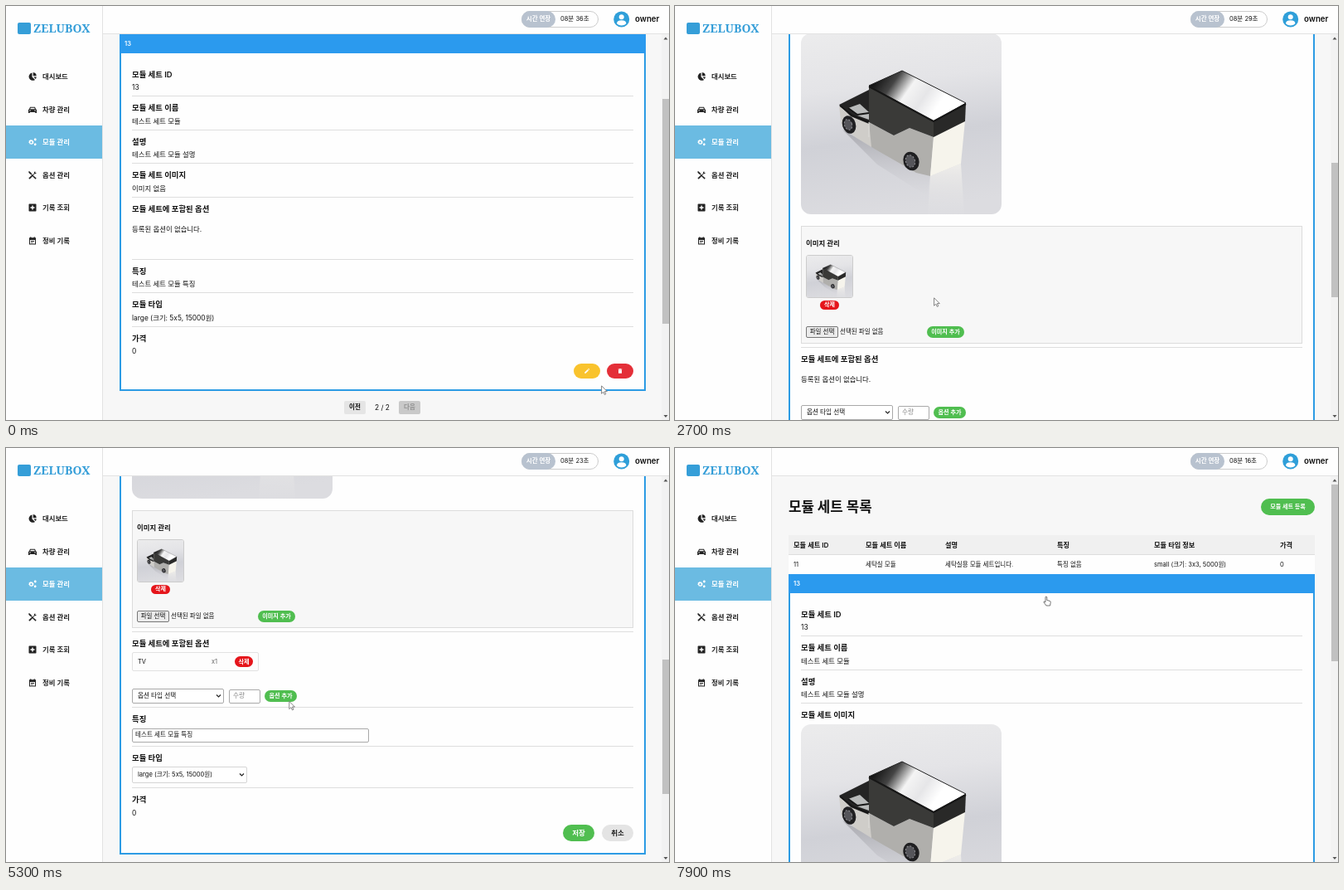
Recreate the animation shown at these times as an HTML page. Size 800x499 px, loop 8000 ms.

```html
<!DOCTYPE html>
<html>
<head>
<meta charset="utf-8">
<title>Module management</title>
<style>
* { box-sizing: border-box; }
html, body { margin: 0; width: 100%; height: 100%; overflow: hidden; }
body { font: 8.4px/20px Inter, "Noto Sans CJK KR", "Noto Sans CJK", sans-serif; color: #111; }
#stage { position: relative; width: 800px; height: 499px; overflow: hidden; background: #f7f7f7; }
#stage div, #stage p, #stage svg { position: absolute; margin: 0; white-space: nowrap; }
#page { left: 0; top: 0; width: 791px; }
.box { display: flex; align-items: center; justify-content: center; line-height: 1; }
.start { justify-content: flex-start; }
.label { font-size: 9.4px; font-weight: 600; }
.title { font-size: 16.8px; font-weight: 700; }
.th { font-size: 8.2px; font-weight: 600; }
.small { font-size: 7.5px; }
.sub { font-size: 8.4px; font-weight: 600; }
.dim { color: #666; }
.white { background: #fefefe; }
.head { background: #f0f0f0; }
.rule { background: #dedede; height: 1px; }
.blue { background: #2b9aee; color: #fff; font-weight: 600; font-size: 7.5px; padding-left: 6px; }
.panel { background: #fefefe; border: 2px solid #2c9be4; }
.pill { border-radius: 10px; color: #fff; font-size: 7.1px; font-weight: 600; }
.green { background: #50be50; }
.red { background: #e5151b; }
.delete { background: #e42f38; }
.yellow { background: #f9c32d; }
.cancel { background: #e4e4e4; color: #222; }
.big { font-size: 8.5px; }
.page { background: #e5e5e5; border-radius: 2px; font-size: 7.5px; font-weight: 600; }
.off { background: #c9c9c9; color: #929292; }
.field { background: #fff; border: 1px solid #a9a9a9; border-radius: 2px; font-size: 7.6px; padding-left: 3px; }
.select { padding-left: 6px; }
.light { border-color: #d5d5d5; }
.focus { border: 2px solid #111; padding-left: 5px; }
.hint { color: #888; padding-left: 4px; }
.area { align-items: flex-start; padding-top: 5px; }
.group { background: #f7f7f7; border: 1px solid #dcdcdc; }
.item { background: #fdfdfd; border: 1px solid #e2e2e2; border-radius: 2px; }
.file { background: #ebebeb; border: 1px solid #777; border-radius: 2px; font-size: 7.5px; }
.photo { border-radius: 12px; overflow: hidden; }
.thumb { border: 1px solid #ccc; border-radius: 3px; overflow: hidden; }
#side { left: 0; top: 0; width: 117px; height: 499px; background: #fefefe; border-right: 1px solid #e2e2e2; }
#bar { left: 117px; top: 0; width: 683px; height: 34px; background: #fefefe; border-bottom: 1px solid #e2e2e2; }
.menu { font-weight: 600; }
.on { background: #6bbbe2; }
.logo { font: 700 14px/20px "Noto Serif", serif; color: #359ed8; }
.mark { background: #359ed8; border-radius: 2px; }
.clock { border: 1px solid #ccc; border-radius: 10px; }
.extend { background: #b8c2cf; border-radius: 10px; color: #fff; font-size: 7.5px; font-weight: 600; }
.user { font-size: 9.7px; font-weight: 600; }
#track { left: 791px; top: 34px; width: 9px; height: 465px; background: #f2f2f2; }
#grip { left: 792px; width: 8px; background: #c1c1c1; }
</style>
</head>
<body>
<div id="stage">
  <svg width="0" height="0">
    <defs>
      <linearGradient id="floor" x1=".2" y1="0" x2=".35" y2="1">
        <stop offset="0" stop-color="#ebebec"/><stop offset=".3" stop-color="#e4e4e7"/>
        <stop offset=".6" stop-color="#d0d1d7"/><stop offset="1" stop-color="#dcdce0"/>
      </linearGradient>
      <linearGradient id="roof" gradientUnits="userSpaceOnUse" x1="92" y1="52" x2="158" y2="98">
        <stop offset="0" stop-color="#111"/><stop offset=".25" stop-color="#444"/>
        <stop offset=".5" stop-color="#f4f4f4"/><stop offset=".75" stop-color="#e6e6e8"/>
        <stop offset="1" stop-color="#fff"/>
      </linearGradient>
      <linearGradient id="gloss" x1="0" y1="0" x2="0" y2="1">
        <stop offset="0" stop-color="#f5f3ee" stop-opacity=".8"/><stop offset="1" stop-color="#e4e4e6" stop-opacity=".1"/>
      </linearGradient>
      <linearGradient id="shade" x1="0" y1="0" x2="0" y2="1">
        <stop offset="0" stop-color="#8f8f95" stop-opacity=".6"/><stop offset="1" stop-color="#c4c4ca" stop-opacity="0"/>
      </linearGradient>
    </defs>
    <symbol id="van" viewBox="0 0 242 218" preserveAspectRatio="xMidYMid slice">
      <path fill="url(#floor)" d="M0 0h242v218H0z"/>
      <path fill="url(#shade)" d="M50 116l28 16 62 34 16 6-4 24-60-38z"/>
      <path fill="url(#gloss)" d="M156 172l37-15 4 61h-44z"/>
      <path fill="#b0afac" d="M82 107l30 16 19-9 29 11-4 47-17-4-54-31-3-8z"/>
      <path fill="#cfcdc9" d="M46 88l36 19 3 30-18-11-18-14z"/>
      <path fill="#242424" d="M46 86l36-18v41l-22-9z"/>
      <path fill="#b9bbbb" d="M57 90l14-5 11 10v9l-14-5z"/>
      <path fill="none" stroke="#161616" stroke-width="2" d="M47 87l15 12 20 8M57 90l11 8 14-2"/>
      <path fill="#3a3a38" d="M82 63l78 43v19l-29-11-19 9-30-16z"/>
      <path fill="#f6f4ec" d="M160 125l38-20-5 52-37 15z"/>
      <path fill="#292928" d="M160 106l39-22-1 22-38 19z"/>
      <path fill="url(#roof)" stroke="#222" d="M82 63l40-18 77 39-39 22z"/>
      <path fill="none" stroke="#161616" stroke-width="2" d="M82 64l78 42 39-21"/>
      <path fill="none" stroke="#dddcd8" d="M82 107v18"/>
      <g fill="#202022">
        <ellipse cx="58" cy="110" rx="8" ry="11" transform="rotate(-18 58 110)"/>
        <ellipse cx="133" cy="154" rx="9.5" ry="11.5" transform="rotate(-18 133 154)"/>
      </g>
      <g fill="#55555a" stroke="#8f8f93" stroke-dasharray="2 2">
        <ellipse cx="57" cy="110" rx="4.5" ry="6.5" transform="rotate(-18 57 110)"/>
        <ellipse cx="132" cy="154" rx="5.5" ry="7.5" transform="rotate(-18 132 154)"/>
      </g>
    </symbol>
  </svg>
  <div id="page"></div>
  <div id="side"></div>
  <div id="bar"></div>
  <div id="top"></div>
  <div id="track"></div>
  <div id="grip"></div>
  <svg style="left:791px;top:34px" width="9" height="465" fill="#555"><path d="M2.5 6.5L5 3.5l2.5 3zM2.5 459L5 462l2.5-3z"/></svg>
  <svg id="arrow" width="10" height="14"><path d="M.6.8v9.4l2.2-2 1.5 3.2 1.5-.7-1.5-3.1h3z" fill="#fff" stroke="#777" stroke-width=".9"/></svg>
  <svg id="hand" width="12" height="15"><path d="M3 1.5q1-1 1.8.2v3.8l3.4.8q1.2.4 1 2l-.6 3.7H4L1 8q-.3-1.2 1-1l1 .8z" fill="#fff" stroke="#666" stroke-width=".9"/></svg>
</div>
<script>
const $ = id => document.getElementById(id);
const text = (x, y, str, cls = "") => `<p class="${cls}" style="left:${x}px;top:${y - 10}px">${str}</p>`;
const box = (x, y, w, h, cls, str = "") =>
  `<div class="box ${cls}" style="left:${x}px;top:${y}px;width:${w}px;height:${h}px">${str}</div>`;
const mid = (x, y, w, h, cls, str) => box(x, y - h / 2, w, h, cls, str);
const icon = (x, y, d, fill = "#222") =>
  `<svg style="left:${x - 5}px;top:${y - 5}px" width="10" height="10" fill="${fill}" fill-rule="evenodd"><path d="${d}"/></svg>`;
const rule = y => box(152, y, 605, 1, "rule");
const row = (xs, y, words, cls) => xs.map((x, i) => text(x, y, words[i], cls)).join("");
const van = (w, h) => `<svg width="${w}" height="${h}" style="left:0;top:0"><use href="#van" width="${w}" height="${h}"/></svg>`;
const select = (y, w, h, cls, str) => mid(152, y, w, h, "field start select " + cls, str) +
  `<svg style="left:${152 + w - 10}px;top:${y - 3}px" width="7" height="6" fill="none" stroke="#222" stroke-width="1.2"><path d="M1 1.5l2.5 2.5L6 1.5"/></svg>`;

const SHAPES = {
  pie: "M4.5.5v5l3.6 3.4A4.7 4.7 0 1 1 4.5.5zM5.7 0a4.5 4.5 0 0 1 4 4.3H5.7zM6.3 5.4h3.4a4 4 0 0 1-1 2.6z",
  car: "M0 5l1-.7L2 1.7h6l1 2.6 1 .7v4H8.3V8H1.7v1H0zM2.2 4.2h5.6L7.3 2.7H2.7zM1.2 5.4v1.2h1.5V5.4zM7.3 5.4v1.2h1.5V5.4z",
  gears: "M3 2l1 .7 1.2-.2.4 1.2 1 .8-.5 1 .2 1.3-1.2.4L4 8l-1-.6-1.3.2-.4-1.3-1.1-.8.6-1.1-.1-1.2 1.2-.4zM3.4 4a1.2 1.2 0 1 0 .1 0zM8 0l.8.7 1 .4-.4 1 .1 1-1.1.4L7.300 3l-.6-1 .6-1zM8 6l.9.7.9.5-.5.9-.1 1-1 .2-1-.4-.5-1 .6-.9z",
  tools: "M1 0l2.800 2.600.1 1L5 4.700l2-2-.2-1.200L8.300 0v2H10L8.500 3.300l-1-.1-1.700 2 3.900 3.300-1.200 1.300L5 6.200 1.600 9.700.3 8.400 4 5 2.800 3.800l-1-.2L0 1z",
  plus: "M1 .5h8l.5.5v8l-.5.5H1L.5 9V1zM4.300 2.500v1.800H2.500v1.400h1.800v1.800h1.400V5.700h1.800V4.300H5.700V2.500z",
  date: "M1 1.200h1.300V.3h1.100v.9h3.200V.3h1.100v.9H9v8.300H1zM2 4v4.500h6V4zM3 5h4v.9H3zM3 6.700h2.500v.8H3z",
  pen: "M2.200 6.500l3.600-3.600 1.300 1.300-3.600 3.600H2.200zM6.300 2.400l.6-.6 1.300 1.300-.6.6z",
  bin: "M2.700 2.400h1.400l.4-.5h1l.4.5h1.400v.8H2.700zM3 3.600h4v4.200H3z"
};

function chrome() {
  const items = ["대시보드", "차량 관리", "모듈 관리", "옵션 관리", "기록 조회", "정비 기록"];
  const kinds = ["pie", "car", "gears", "tools", "plus", "date"];
  const menu = items.map((name, i) => {
    const y = 85.3 + i * 39.5, active = i === 2;
    return (active ? box(0, 144, 116, 40, "on") : "") + icon(32, y, SHAPES[kinds[i]], active ? "#fff" : "#222") +
      `<span style="color:${active ? "#fff" : "#222"}">${text(44, y, name, "menu")}</span>`;
  }).join("");
  $("side").innerHTML = box(14, 20, 16, 14, "mark") + text(33, 27, "ZELUBOX", "logo") + menu;
  $("top").innerHTML = box(622, 6, 93, 20, "clock") + box(622, 6, 41, 20, "extend", "시간 연장") +
    `<p id="clock" class="small" style="left:669px;top:6px"></p>` +
    `<svg style="left:733px;top:6px" width="20" height="20"><circle cx="9.7" cy="10" r="9.5" fill="#2f9fd9"/><g fill="#fff"><circle cx="9.7" cy="7.2" r="3"/><path d="M4 15.2q0-4 5.700-4t5.700 4q-2.200 2.300-5.700 2.300T4 15.2z"/></g></svg>` +
    text(759, 16, "owner", "user");
}

function setTable() {
  const xs = [143, 230, 326, 461, 578, 730];
  return text(137, 71, "모듈 세트 목록", "title") + box(707, 61, 65, 20, "pill green", "모듈 세트 등록") +
    box(137, 105, 635, 24, "head") + box(137, 129, 635, 23, "white") + box(137, 128, 635, 1, "rule") +
    row(xs, 116.5, ["모듈 세트 ID", "모듈 세트 이름", "설명", "특징", "모듈 타입 정보", "가격"], "th") +
    row(xs, 140.5, ["11", "세탁실 모듈", "세탁실용 모듈 세트입니다.", "특징 없음", "small (크기: 3x3, 5000원)", "0"], "small") +
    box(137, 152, 635, 23, "blue start", "13");
}

function moduleTable(y) {
  const xs = [143, 206, 332, 405, 469, 621];
  return mid(408, y, 26, 16, "page", "이전") + text(445, y, "2 / 2") + mid(474, y, 26, 16, "page off", "다음") +
    text(137, y + 41.5, "모듈 목록", "title") + mid(722, y + 41.5, 50, 20, "pill green", "모듈 등록") +
    box(137, y + 75, 635, 24, "head") + box(137, y + 99, 635, 47, "white") +
    row(xs, y + 87, ["모듈 ID", "NFC 태그 ID", "모듈 타입", "상태", "등록 일자", "수정 일자"], "th") +
    row(xs, y + 111, ["1", "043F8E6A6C1D90", "small", "비활성화", "2024. 7. 1. 오전 12:00:00", "2025. 2. 21. 오전 9:43:43"], "small") +
    box(137, y + 122, 635, 1, "rule");
}

const entry = (y, name, value) => text(152, y, name, "label") + text(152, y + 15.5, value);
const photo = y => box(152, y, 242, 218, "photo", van(242, 218));

function viewForm({ img, opt }) {
  let out = entry(200.7, "모듈 세트 ID", "13") + rule(226) + entry(241.2, "모듈 세트 이름", "테스트 세트 모듈") + rule(266.5) +
    entry(281.7, "설명", "테스트 세트 모듈 설명") + rule(307);
  out += img ? text(152, 322.2, "모듈 세트 이미지", "label") + photo(333) : entry(322.2, "모듈 세트 이미지", "이미지 없음");
  const y = img ? 573 : 362.7;
  out += rule(y - 15) + text(152, y, "모듈 세트에 포함된 옵션", "label");
  out += opt ? box(152, y + 10, 120, 20, "item") + text(159, y + 20.5, "TV", "small") + text(248, y + 20.5, "x1", "small dim")
    : text(152, y + 24, "등록된 옵션이 없습니다.");
  const f = y + (opt ? 70.5 : 75);
  out += rule(f - 15) + entry(f, "특징", "테스트 세트 모듈 특징") + rule(f + 25.5) +
    entry(f + 40.5, "모듈 타입", "large (크기: 5x5, 15000원)") + rule(f + 66) + entry(f + 81, "가격", "0") +
    mid(685, f + 120.5, 32, 18, "pill yellow") + mid(725, f + 120.5, 32, 18, "pill delete") +
    icon(701, f + 120.5, SHAPES.pen, "#fff") + icon(741, f + 120.5, SHAPES.bin, "#fff");
  return { out, bottom: f + 144.5, pager: f + 164.5 };
}

function editForm({ img, opt, file, pick, qty }) {
  let out = entry(200.7, "모듈 세트 ID", "13") + rule(226) +
    text(152, 241, "모듈 세트 이름", "label") + mid(152, 260, 286, 17, "field start", "테스트 세트 모듈") + rule(273) +
    text(152, 288, "설명", "label") + box(152, 298, 231, 120, "field start area", "테스트 세트 모듈 설명") + rule(424) +
    text(152, 439, "모듈 세트 이미지", "label");
  const g = img ? 682 : 471, h = img ? 142 : 98;
  out += (img ? photo(450) : text(152, 454.5, "이미지 없음")) + box(152, g, 605, h, "group") + text(158, g + 20.5, "이미지 관리", "sub");
  out += img ? box(158, g + 35, 57, 52, "thumb", van(57, 52)) + mid(175, g + 95, 23, 11, "pill red", "삭제")
    : text(158, g + 47.5, "등록된 이미지가 없습니다.", "small");
  const r = g + h - 14;
  out += mid(158, r, 39, 14, "file", "파일 선택") + text(199, r, file ? "1. 기본 장착 상태.JPG" : "선택된 파일 없음", "small") +
    mid(304, r, 45, 14, "pill green", "이미지 추가") + rule(r + 18);
  const y = r + 33;
  out += text(152, y, "모듈 세트에 포함된 옵션", "label");
  out += opt ? box(152, y + 10, 153, 23, "item") + text(159, y + 21.5, "TV", "small") + text(248, y + 21.5, "x1", "small dim") +
    mid(276, y + 21.5, 22, 13, "pill red", "삭제") : text(152, y + 24, "등록된 옵션이 없습니다.");
  const s = y + (opt ? 63 : 64);
  out += select(s, 111, 18, pick && !qty ? "focus" : "", pick ? "TV" : "옵션 타입 선택") +
    mid(269, s, 38, 17, "field start " + (qty ? "focus" : "hint"), qty ? "1" : "수량") + mid(312, s, 39, 14, "pill green", "옵션 추가") +
    rule(s + 13) + text(152, s + 28, "특징", "label") + mid(152, s + 47, 286, 17, "field start", "테스트 세트 모듈 특징") + rule(s + 60);
  const m = s + 75;
  out += text(152, m, "모듈 타입", "label") + select(m + 20, 139, 20, "light", "large (크기: 5x5, 15000원)") + rule(m + 35) +
    entry(m + 50, "가격", "0") + mid(672, m + 90, 38, 20, "pill green big", "저장") + mid(719, m + 90, 38, 20, "pill cancel big", "취소");
  return { out, bottom: m + 115.5, pager: m + 134.5 };
}

// Page states by start time
const STATES = [
  [0, {}],
  [300, { edit: 1 }],
  [1700, { edit: 1, file: 1 }],
  [2200, { edit: 1, img: 1 }],
  [3900, { edit: 1, img: 1, pick: 1 }],
  [4700, { edit: 1, img: 1, pick: 1, qty: 1 }],
  [5200, { edit: 1, img: 1, opt: 1 }],
  [6600, { img: 1, opt: 1 }]
];
const SCROLL = [[0, 118], [400, 118], [800, 259], [2300, 259], [2700, 417], [2800, 417], [3300, 607], [5500, 607],
  [5900, 717], [6599, 717], [6600, 507], [6900, 507], [7100, 439], [7700, 0], [8000, 0]];
const CURSOR = [[0, 718, 457], [200, 702, 441], [400, 690, 436], [900, 180, 296], [1400, 180, 296], [1900, 309, 332],
  [2100, 326, 296], [2300, 322, 310], [2700, 312, 351], [3300, 225, 300], [3800, 210, 308], [4100, 337, 282],
  [4400, 287, 300], [4800, 287, 300], [5100, 330, 300], [5400, 345, 306], [6000, 469, 321], [6400, 690, 354],
  [6700, 690, 356], [7100, 666, 355], [7700, 447, 178], [8000, 447, 178]];

function at(keys, t, n = 1) {
  const i = Math.max(1, keys.findIndex(k => k[0] > t));
  const a = keys[i - 1], b = keys[i], u = (t - a[0]) / (b[0] - a[0]);
  return a[n] + (b[n] - a[n]) * u * u * (3 - 2 * u);
}

let shown = null, height = 0;
function setState(state) {
  if (state === shown) return;
  shown = state;
  const { out, bottom, pager } = state.edit ? editForm(state) : viewForm(state);
  $("page").innerHTML = box(137, 173, 635, bottom - 173, "panel") + setTable() + out + moduleTable(pager);
  height = pager + 165;
}

function draw(now) {
  const t = Math.floor(now % 8000 / 100) * 100;
  setState(STATES.filter(s => s[0] <= t).pop()[1]);
  const y = Math.round(at(SCROLL, t)), scale = 445 / height;
  $("page").style.transform = `translateY(${-y}px)`;
  $("grip").style.top = 44 + y * scale + "px";
  $("grip").style.height = 466 * scale + "px";
  const sec = 36 - Math.floor((t + 200) / 400);
  $("clock").textContent = `08분 ${String(sec).padStart(2, "0")}초`;
  const point = t >= 7700;
  $("arrow").style.display = point ? "none" : "block";
  $("hand").style.display = point ? "block" : "none";
  const pos = `translate(${at(CURSOR, t, 1)}px,${at(CURSOR, t, 2)}px)`;
  $("arrow").style.transform = pos;
  $("hand").style.transform = pos + " translateX(-3px)";
}

chrome();
const start = performance.now();
(function tick() {
  draw(performance.now() - start);
  requestAnimationFrame(tick);
})();
</script>
</body>
</html>
```
